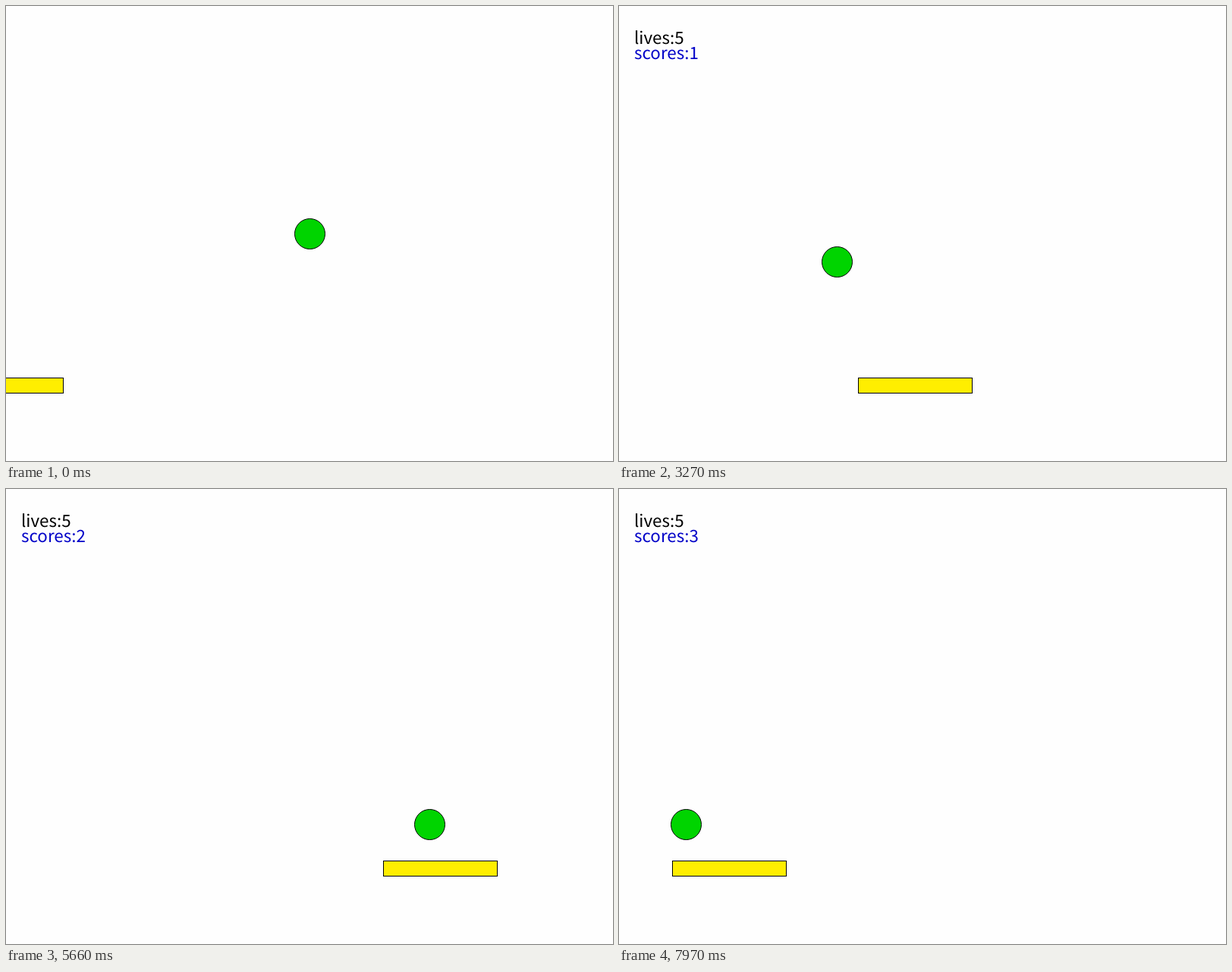
An HTML page that plays this animation: 800x600 px, repeating every 8000 ms.

```html
<!DOCTYPE html>
<html lang="en">
<head>
<meta charset="utf-8">
<title>Paddle ball</title>
<style>
  html, body { margin: 0; width: 100%; height: 100%; overflow: hidden; background: #fefefe; }
  svg { display: block; width: 800px; height: 600px; }
  text {
    font: 22.4px "Noto Sans CJK SC", "Noto Sans CJK JP", "Noto Sans CJK", sans-serif;
    text-rendering: geometricPrecision;
  }
  .shape { stroke: #000; stroke-width: 1; }
</style>
</head>
<body>
<svg viewBox="0 0 800 600">
  <g id="hud" visibility="hidden">
    <text x="20" y="50">lives:5</text>
    <text id="score" x="20" y="70" fill="#0000c8">scores:0</text>
  </g>
  <rect id="paddle" class="shape" x="-74.5" y="490.5" width="150" height="20" fill="#ffee00"/>
  <circle id="ball" class="shape" cx="400.5" cy="300.5" r="20" fill="#00d400"/>
</svg>
<script>
  const LOOP = 8000, WIDTH = 800, PADDLE_TOP = 490, RADIUS = 20;
  const $ = id => document.getElementById(id);
  const hud = $('hud'), score = $('score'), paddle = $('paddle'), ball = $('ball');

  const linear = u => u;
  const easeIn = u => u ** 4;
  const easeOut = u => 1 - (1 - u) ** 4;

  // Where the player's hand rests or turns, and how many game steps have run by then.
  const moves = [
    { ms: 100, step: 0, hand: 0 },
    { ms: 1240, step: 56, hand: 509, ease: easeOut },
    { ms: 2300, step: 112, hand: 541, ease: linear },
    { ms: 3270, step: 166, hand: 390, ease: linear },
    { ms: 5000, step: 257, hand: 418, ease: easeIn },
    { ms: 6320, step: 330, hand: 582, ease: easeOut },
    { ms: 7970, step: 418, hand: 145, ease: linear },
  ];

  const mix = (a, b, u) => a + (b - a) * u;

  function input(t) {
    const to = moves.find((m, i) => i && t <= m.ms) || moves.at(-1);
    const from = moves[moves.indexOf(to) - 1];
    const u = Math.max(0, (t - from.ms) / (to.ms - from.ms));
    return {
      step: Math.floor(mix(from.step, to.step, u) + 0.2),
      hand: Math.round(mix(from.hand, to.hand, to.ease(u))),
    };
  }

  // One pixel per step faster about every 131 steps.
  const speedAt = n => 5 + Math.floor((n + 17) / 131);

  // The ball turns after it has crossed a wall or the paddle line.
  function ballAt(step) {
    let x = 400, y = 300, dx = 1, dy = -1, hits = 0;
    for (let n = 1; n <= step; n++) {
      x += dx * speedAt(n);
      y += dy * speedAt(n);
      if (x > WIDTH - RADIUS) dx = -1;
      if (x < RADIUS) dx = 1;
      if (y < RADIUS) dy = 1;
      if (y > PADDLE_TOP - RADIUS && dy > 0) { dy = -1; hits++; }
    }
    return { x, y, hits };
  }

  function draw(t) {
    const { step, hand } = input(t);
    const { x, y, hits } = ballAt(step);
    ball.setAttribute('cx', x + 0.5);
    ball.setAttribute('cy', y + 0.5);
    paddle.setAttribute('x', hand - 74.5);
    hud.setAttribute('visibility', t < 20 ? 'hidden' : 'visible');
    score.textContent = 'scores:' + hits;
  }

  const start = performance.now();
  function tick() {
    draw((performance.now() - start) % LOOP);
    requestAnimationFrame(tick);
  }
  draw(0);
  requestAnimationFrame(tick);
</script>
</body>
</html>
```
